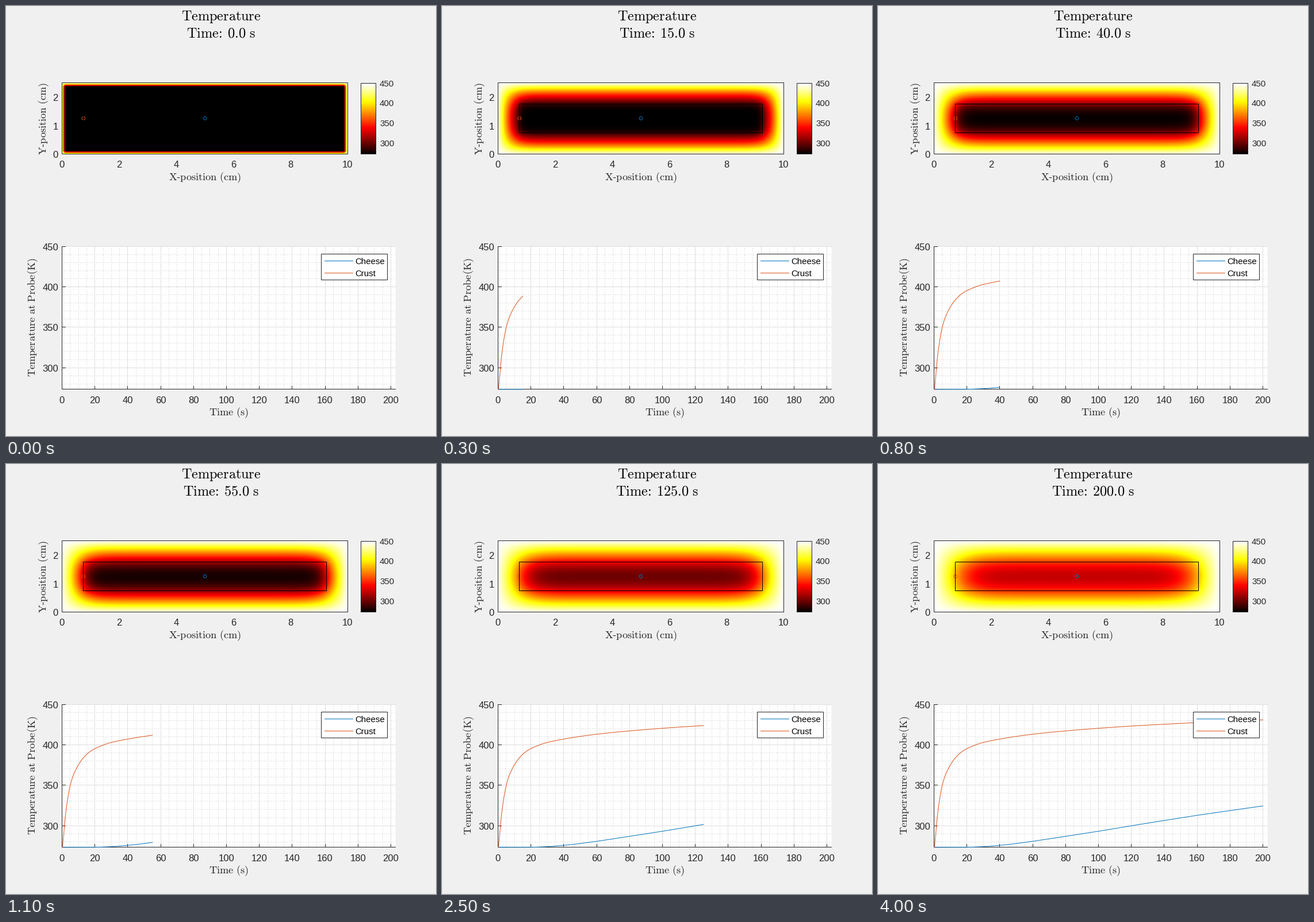
Recreate the animation shown at these times as a matplotlib script. Size 748 by 748 pixels, loop 4100 ms.

```python
import numpy as np
import matplotlib.pyplot as plt
from matplotlib.animation import FuncAnimation
from matplotlib.colors import LinearSegmentedColormap
from matplotlib.patches import Circle, Rectangle

plt.rcParams["font.family"] = "Liberation Sans"
plt.rcParams["mathtext.fontset"] = "cm"
plt.rcParams["path.snap"] = False

SIZE, PT = 748, 0.72            # stage in pixels, points per pixel
FRAMES, STEP = 41, 5.0          # seconds of baking per frame
COLD, HOT = 273.15, 450.0
INK, BLUE, ORANGE = "#262626", "#0072BD", "#D95319"

# Heat map, colour bar and chart boxes: left, top, right, bottom
MAP = (97.5, 133.5, 594.5, 257.5)
BAR = (617.5, 134.5, 643.5, 257.5)
CHART = (97.5, 418.5, 677.0, 666.5)
CM = 49.7                       # pixels per centimetre


# ---------- heat model ----------
def simulate():
    """Temperature on the node grid at every frame."""
    h, dt = 0.125, 0.1
    k = np.full((20, 80), 0.866)
    cap = np.full((20, 80), 86.6)
    k[6:14, 6:74], cap[6:14, 6:74] = 1.0, 840.0
    kx = (k[:-1] + k[1:]) / 2
    ky = (k[:, :-1] + k[:, 1:]) / 2
    c = (cap[:-1, :-1] + cap[1:, :-1] + cap[:-1, 1:] + cap[1:, 1:]) / 4
    gain = dt / (h * h * c)

    temp = np.full((21, 81), HOT)
    temp[1:-1, 1:-1] = COLD
    fields = [temp.copy()]
    for _ in range(FRAMES - 1):
        for _ in range(round(STEP / dt)):
            flow = np.diff(kx * np.diff(temp[1:-1], axis=1), axis=1)
            flow += np.diff(ky * np.diff(temp[:, 1:-1], axis=0), axis=0)
            temp[1:-1, 1:-1] += gain * flow
        fields.append(temp.copy())
    return fields


def hermite(x, xp, yp):
    """Smooth curve through a few points."""
    xp, yp = np.array(xp, float), np.array(yp, float)
    m = np.gradient(yp, xp)
    i = np.clip(np.searchsorted(xp, x, "right") - 1, 0, len(xp) - 2)
    w = xp[i + 1] - xp[i]
    u = (x - xp[i]) / w
    return ((2 * u**3 - 3 * u**2 + 1) * yp[i] + (u**3 - 2 * u**2 + u) * w * m[i]
            + (3 * u**2 - 2 * u**3) * yp[i + 1] + (u**3 - u**2) * w * m[i + 1])


fields = simulate()
times = np.arange(0, 200.01, 0.25)
cheese = hermite(times, [0, 10, 20, 30, 40, 55, 75, 95, 120, 155, 200],
                 [COLD, COLD, 273.25, 274, 275.6, 279.2, 285.2, 291.4, 299.8, 311.2, 324.4])
crust = hermite(np.sqrt(times),
                np.sqrt([0, 0.5, 1, 2.5, 5, 10, 15, 25, 40, 55, 95, 155, 200]),
                [COLD, 278, 289.5, 320, 350, 375.4, 388.3, 399.8, 407.2, 411.9,
                 419.8, 427.1, 431])


# ---------- drawing helpers ----------
fig = plt.figure(figsize=(7.48, 7.48), dpi=100, facecolor="#f0f0f0")
ax = fig.add_axes([0, 0, 1, 1])
ax.axis("off")


def tex(s):
    """Computer Modern roman text, with a wider gap after a colon."""
    s = s.replace("-", "\u2010")
    words = [r"\text{%s}" % w + (r"\hspace{0.111}" if w.endswith(":") else "")
             for w in s.split(" ")]
    return "$" + r"\ ".join(words) + "$"


def label(x, y, s, px, ha="center", color=INK, **kw):
    return ax.text(x, y, s, fontsize=px * PT, ha=ha, va="baseline",
                   color=color, zorder=9, **kw)


def upright(x, y, s):
    label(x, y, tex(s), 18.35, rotation=90, rotation_mode="anchor")


def crisp(v):
    """Centre of the pixel that holds v."""
    return np.floor(v) + 0.5


def line(xs, ys, color=INK, z=4, **kw):
    """Straight one-pixel line."""
    return ax.plot(crisp(xs), crisp(ys), color=color, lw=PT, zorder=z, **kw)[0]


def box(l, t, r, b, face="none", edge=INK, z=4):
    l, t, r, b = crisp([l, t, r, b])
    patch = Rectangle((l, t), r - l, b - t, fc=face, ec=edge, lw=PT, zorder=z)
    return ax.add_patch(patch)


def map_x(x):
    return MAP[0] + CM * x


def map_y(y):
    return MAP[3] - CM * y


def time_x(t):
    return CHART[0] + 2.86 * t


def temp_y(k):
    return 666.8 - 1.405 * (k - COLD)


hot = LinearSegmentedColormap.from_list(
    "oven", [(0, "black"), (0.375, "red"), (0.75, "yellow"), (1, "white")], N=256)


def picture(data, extent, **kw):
    return ax.imshow(data, cmap=hot, vmin=COLD, vmax=HOT, extent=extent,
                     origin="lower", aspect="auto", zorder=2, **kw)


# ---------- heat map ----------
half = CM * 0.125 / 2
heat = picture(fields[0], (MAP[0] - half, MAP[2] + half, MAP[3] + half, MAP[1] - half),
               interpolation="bilinear")
heat.set_clip_path(Rectangle((MAP[0], MAP[1]), MAP[2] - MAP[0], MAP[3] - MAP[1],
                             transform=ax.transData))
for x, color in ((0.75, ORANGE), (5, BLUE)):
    ax.add_patch(Circle((map_x(x), map_y(1.25)), 2.8, fc="none", ec=color,
                        lw=PT, zorder=3))
box(map_x(0.75), map_y(1.75), map_x(9.25), map_y(0.75), edge="black")
box(*MAP)

for v in range(0, 11, 2):
    label(map_x(v), 281.3, str(v), 16.67)
for v in range(3):
    label(91, map_y(v) + 6.8, str(v), 16.67, "right")
label(345.7, 302.7, tex("X-position (cm)"), 18.35)
upright(69.7, 195.5, "Y-position (cm)")

# ---------- colour bar ----------
picture(np.linspace(COLD, HOT, 256)[:, None], (BAR[0], BAR[2], BAR[3], BAR[1]))
box(*BAR)
for k in range(300, 451, 50):
    y = BAR[3] - (k - COLD) / (HOT - COLD) * (BAR[3] - BAR[1])
    label(650, y + 5.2, str(k), 15, "left")

# ---------- chart ----------
box(*CHART, face="white", edge="none", z=1)
dots = dict(color="#bdbdbd", z=2, dashes=(1, 3), dash_capstyle="butt")
for t in range(5, 201, 5):
    if t % 20:
        line([time_x(t)] * 2, [CHART[3], CHART[1]], **dots)
for k in range(280, 450, 10):
    if k % 50:
        line([CHART[0], CHART[2]], [temp_y(k)] * 2, **dots)

for t in range(0, 201, 20):
    x = time_x(t)
    line([x, x], [CHART[1], CHART[3]], "#dedede", 3)
    line([x, x], [CHART[3], CHART[3] - 5.5])
    label(x, 691.2, str(t), 16.67)
for k in range(300, 451, 50):
    y = temp_y(k)
    line([CHART[0], CHART[2]], [y, y], "#dedede", 3)
    line([CHART[0], CHART[0] + 5.5], [y, y])
    label(91, y + 6.5, str(k), 16.67, "right")
line([CHART[0], CHART[0], CHART[2]], [CHART[1], CHART[3], CHART[3]])
label(387.5, 711.7, tex("Time (s)"), 18.35)
upright(51.5, 541.7, "Temperature at Probe(K)")

curves = [(line([], [], BLUE, 5), cheese), (line([], [], ORANGE, 5), crust)]

# ---------- legend ----------
box(548.5, 431.5, 663.5, 476.5, face="white", z=6)
for y, name, color in ((443.5, "Cheese", BLUE), (464.5, "Crust", ORANGE)):
    line([554, 603], [y, y], color, 7)
    label(607.3, y + 5.8, name, 15, "left", "black")

# ---------- title ----------
label(374, 25.3, tex("Temperature"), 24.2, color="black")
clock = label(374, 54.3, "", 24.2, color="black")

ax.set_xlim(0, SIZE)
ax.set_ylim(SIZE, 0)


def update(n):
    now = n * STEP
    heat.set_data(fields[n])
    clock.set_text(tex(f"Time: {now:.1f} s"))
    shown = times <= now
    for curve, temps in curves:
        curve.set_data(time_x(times[shown]), temp_y(temps[shown]))
    return [heat, clock] + [curve for curve, _ in curves]


anim = FuncAnimation(fig, update, frames=FRAMES, interval=100,
                     repeat=True, repeat_delay=0, blit=False)
plt.show()
```
